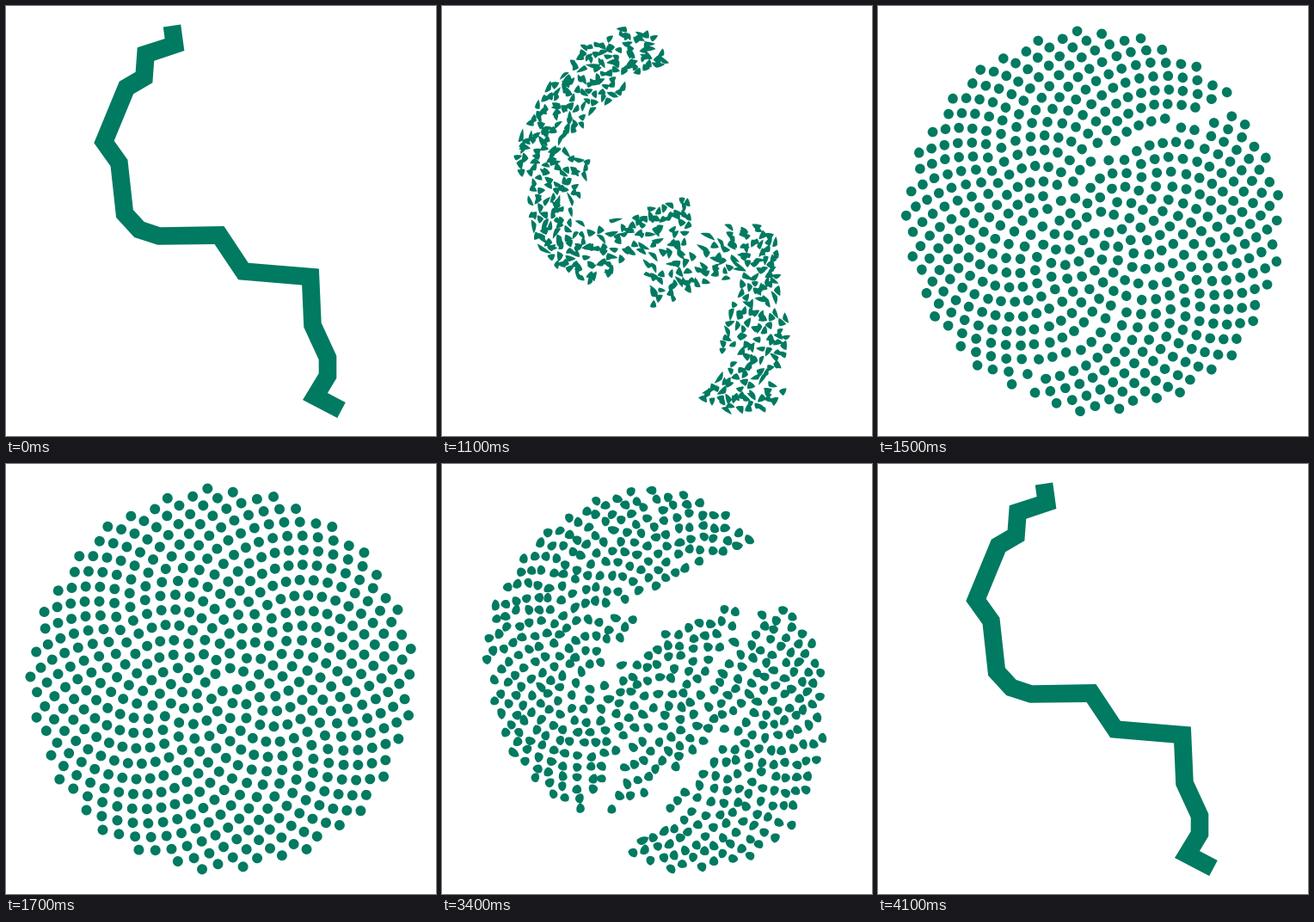
These frames come from a looping animation (500x500 px, 4.8 s). An HTML page with a canvas:

```html
<!DOCTYPE html>
<html lang="en">
<head>
<meta charset="utf-8">
<title>River to sunflower</title>
<style>
  html, body { margin: 0; width: 100%; height: 100%; overflow: hidden; background: #fff; }
  canvas { display: block; width: 100vmin; height: 100vmin; }
</style>
</head>
<body>
<canvas id="stage" width="500" height="500"></canvas>
<script>
const COLOR = '#007a61';
const LOOP = 4800, STEP = 100, STEPS = 11;
const COUNT = 542, CENTER = 250.6, SPREAD = 9.58, DOT = 6;
const HALF_WIDTH = 10.3, LOOSENESS = 14, PER_SIDE = 7;

// Bends of the river's centre line
const river = [
  [193, 23], [196, 45], [162.5, 56], [160.5, 83], [140, 95], [114, 158],
  [131.5, 182.5], [138, 241.5], [155, 260], [178, 267.5], [248, 266.5], [276, 308.5],
  [354, 315], [356.5, 371], [374, 409], [374, 430], [359.5, 454], [390, 470]
];

let seed = 7;
function random() {
  seed = (seed * 16807) % 2147483647;
  return seed / 2147483647;
}

const mix = (a, b, t) => a + (b - a) * t;
const between = (p, q, t) => [mix(p[0], q[0], t), mix(p[1], q[1], t)];
const cross = (a, b, c) => (b[0] - a[0]) * (c[1] - a[1]) - (b[1] - a[1]) * (c[0] - a[0]);
const dist2 = (p, q) => (p[0] - q[0]) ** 2 + (p[1] - q[1]) ** 2;
const centroid = t => [0, 1].map(k => (t[0][k] + t[1][k] + t[2][k]) / 3);

function normal(p, q) {
  const length = Math.sqrt(dist2(p, q));
  return [(q[1] - p[1]) / length, (p[0] - q[0]) / length];
}

// One bank of the line, offset with mitred bends
function bank(line, offset) {
  const normals = line.slice(1).map((p, i) => normal(line[i], p));
  return line.map((p, i) => {
    const a = normals[Math.max(i - 1, 0)];
    const b = normals[Math.min(i, normals.length - 1)];
    const scale = offset / (1 + a[0] * b[0] + a[1] * b[1]);
    return [p[0] + (a[0] + b[0]) * scale, p[1] + (a[1] + b[1]) * scale];
  });
}

// Cut the largest triangle across its longest side until there are enough
function shatter(tris, count) {
  while (tris.length < count) {
    let big = 0;
    tris.forEach((t, i) => { if (cross(...t) > cross(...tris[big])) big = i; });
    const t = tris[big];
    const side = [0, 1, 2].reduce((m, k) =>
      dist2(t[k], t[(k + 1) % 3]) > dist2(t[m], t[(m + 1) % 3]) ? k : m, 0);
    const a = t[side], b = t[(side + 1) % 3], c = t[(side + 2) % 3];
    const m = between(a, b, mix(0.3, 0.7, random()));
    tris.splice(big, 1, [a, m, c], [m, b, c]);
  }
  return tris;
}

// Hungarian method: result[row] = column with the least total cost
function assign(rows, cols) {
  const n = rows.length;
  const u = new Float64Array(n + 1), v = new Float64Array(n + 1);
  const owner = new Int32Array(n + 1), way = new Int32Array(n + 1);
  for (let i = 1; i <= n; i++) {
    const low = new Float64Array(n + 1).fill(Infinity);
    const used = new Uint8Array(n + 1);
    let col = 0;
    owner[0] = i;
    do {
      used[col] = 1;
      const row = owner[col];
      let delta = Infinity, next = 0;
      for (let j = 1; j <= n; j++) {
        if (used[j]) continue;
        const cost = dist2(rows[row - 1], cols[j - 1]) - u[row] - v[j];
        if (cost < low[j]) { low[j] = cost; way[j] = col; }
        if (low[j] < delta) { delta = low[j]; next = j; }
      }
      for (let j = 0; j <= n; j++) {
        if (used[j]) { u[owner[j]] += delta; v[j] -= delta; }
        else low[j] -= delta;
      }
      col = next;
    } while (owner[col]);
    while (col) {
      owner[col] = owner[way[col]];
      col = way[col];
    }
  }
  const result = [];
  for (let j = 1; j <= n; j++) result[owner[j] - 1] = j - 1;
  return result;
}

const right = bank(river, HALF_WIDTH), left = bank(river, -HALF_WIDTH);
const outline = [...right, ...left.slice().reverse()];
const strip = right.slice(1).flatMap((p, i) => [
  [right[i], p, left[i + 1]],
  [right[i], left[i + 1], left[i]]
]);

const golden = Math.PI * (3 - Math.sqrt(5));
const dots = Array.from({ length: COUNT }, (_, k) => {
  const i = k + 1, r = SPREAD * Math.sqrt(i);
  return [CENTER + r * Math.cos(i * golden), CENTER - r * Math.sin(i * golden)];
});

// Matching from loosened positions lets neighbours cross and clump on the way
const tris = shatter(strip, COUNT);
const middles = tris.map(centroid);
const loose = middles.map(p => p.map(x => x + (random() - 0.5) * LOOSENESS));
const match = assign(loose, dots);

// Each piece is a list of [from, to] point pairs
const pieces = tris.map((t, i) => {
  const mid = middles[i], dot = dots[match[i]], n = 3 * PER_SIDE;
  const start = Math.atan2(t[0][1] - mid[1], t[0][0] - mid[0]);
  return Array.from({ length: n }, (_, k) => {
    const side = Math.floor(k / PER_SIDE);
    const from = between(t[side], t[(side + 1) % 3], (k % PER_SIDE) / PER_SIDE);
    const a = start + 2 * Math.PI * k / n;
    return [from, [dot[0] + DOT * Math.cos(a), dot[1] + DOT * Math.sin(a)]];
  });
});

const ease = u => u < 0.5 ? 4 * u ** 3 : 1 - 4 * (1 - u) ** 3;

// Progress of a stepped transition; lead shifts its phase by part of a step
function progress(time, begin, lead) {
  const k = Math.floor((time - begin) / STEP) + 1;
  if (k < 1) return 0;
  return k >= STEPS ? 1 : ease(Math.min(1, (k + lead) / STEPS));
}

const ctx = document.getElementById('stage').getContext('2d');

function trace(points) {
  points.forEach((p, i) => i ? ctx.lineTo(p[0], p[1]) : ctx.moveTo(p[0], p[1]));
  ctx.closePath();
}

function draw(amount) {
  ctx.fillStyle = '#fff';
  ctx.fillRect(0, 0, 500, 500);
  ctx.fillStyle = COLOR;
  ctx.beginPath();
  if (amount === 0) trace(outline);
  else pieces.forEach(pairs => trace(pairs.map(([p, q]) => between(p, q, amount))));
  ctx.fill();
}

let shown = -1;
function tick(now) {
  const time = now % LOOP;
  const amount = progress(time, 700, -0.55) - progress(time, 3100, 0.5);
  if (amount !== shown) draw(shown = amount);
  requestAnimationFrame(tick);
}
tick(performance.now());
</script>
</body>
</html>
```
